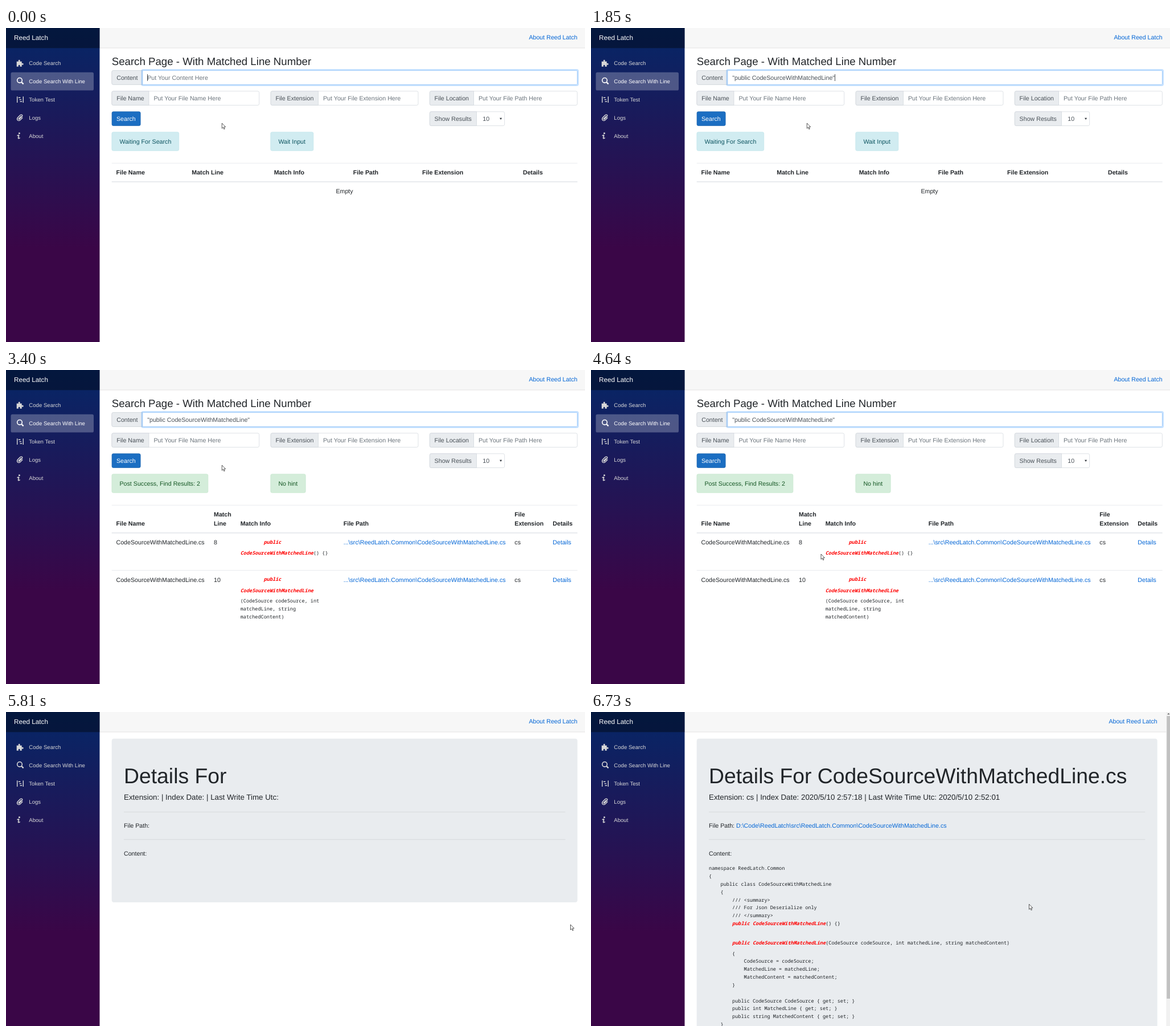
These frames come from a looping animation (1017 by 551 pixels, 8520 ms). An HTML page:

```html
<!DOCTYPE html>
<html lang="en">
<head>
<meta charset="utf-8">
<title>Search demo</title>
<style>
  html, body { margin: 0; width: 100%; height: 100%; overflow: hidden; background: #fff; }
  svg { display: block; width: 1017px; height: 551px; }
  text { font-family: "Liberation Sans", Arial, sans-serif; white-space: pre; text-rendering: geometricPrecision; }
  .mono { font-family: "Noto Sans Mono", monospace; font-size: 8.55px; fill: #212529; }
  .hit { fill: #f00; font-weight: 700; font-style: italic; }
</style>
</head>
<body>
<svg id="stage" viewBox="0 0 1017 551"></svg>
<script>
const LOOP = 8520, BASE = 32 / 3, EDGE = 1003.7;
const INK = '#212529', MUTED = '#495057', HINT = '#6c757d', LINK = '#0366d6';
const BRAND = 'Reed Latch', PROJECT = 'ReedLatch', NAME = 'CodeSourceWithMatchedLine';

// Text is placed by the middle of its line.
const text = (x, y, s, fill = INK, size = BASE, attrs = '') =>
  `<text x="${x}" y="${y + size * 0.3465}" font-size="${size}" fill="${fill}" ${attrs}>${s}</text>`;
const bold = (x, y, s) => text(x, y, s, INK, BASE, 'font-weight="700"');
const mono = (x, y, s) => `<text class="mono" x="${x}" y="${y + 3}">${s}</text>`;
const hit = s => `<tspan class="hit">${s}</tspan>`;
const rect = (x, y, w, h, fill, attrs = '') =>
  `<rect x="${x}" y="${y}" width="${w}" height="${h}" fill="${fill}" ${attrs}/>`;
const round = (x, y, w, h, fill, stroke) =>
  rect(x + .33, y + .33, w - .67, h - .67, fill, `rx="2.5" stroke="${stroke}" stroke-width=".67"`);
const group = (id, s) => `<g id="${id}">${s}</g>`;
const rule = (y, h = .67) => rect(185.7, y, EDGE - 185.7, h, '#dee2e6');

function field(x, split, right, y, label, value) {
  return round(x, y, right - x, 25.33, '#fff', '#ced4da') +
    `<path d="M${split} ${y + .33}H${x + 2.8}q-2.5 0-2.5 2.5v19.7q0 2.5 2.5 2.5H${split}z"
      fill="#e9ecef" stroke="#ced4da" stroke-width=".67"/>` +
    text(x + 8.6, y + 12.67, label, MUTED) + text(split + 8.5, y + 12.67, value, HINT);
}

const alertBox = (id, x, w, s, good) => group(id, good
  ? round(x, 182.3, w, 33.4, '#d4edda', '#c3e6cb') + text(x + 13.9, 199, s, '#155724')
  : round(x, 182.3, w, 33.4, '#d1ecf1', '#bee5eb') + text(x + 13.9, 199, s, '#0c5460'));

const line = (d, w) => `<path d="${d}" fill="none" stroke="currentColor" stroke-width="${w}"/>`;
const icons = [
  `<path transform="translate(18.7 55.7) scale(1.5)" fill="currentColor" d="M3 0Q2 0 2 1q0 .3.3 1H0v6h2.3
    Q2 7.3 2 7q0-1 1-1t1 1q0 .3-.3 1H6V5.7Q6.7 6 7 6q1 0 1-1T7 4q-.3 0-1 .3V2H3.7Q4 1.3 4 1 4 0 3 0z"/>`,
  '<circle cx="24" cy="91.8" r="4.3" fill="none" stroke="currentColor" stroke-width="1.6"/>' +
    line('M27.2 95l3.4 3.4', 2.2),
  line('M19.7 120.3v10.8M30.3 120.3v10.8M21.8 122.2h3.6M23.4 125.6h3.6M24.6 129h3.6', 1.4),
  line('M26.8 154.6l-4.3 4.3q-.8 1.3.4 1.5l4.7-4.3q2.2-2.5.3-3.7-1.6-.8-3.4.9l-4.1 4.2q-1.8 2.6.2 4.5 2.2 1.5 4.4-.5l4.2-4.2', 1.4),
  '<circle cx="23.4" cy="184.8" r="1.5" fill="currentColor"/>' +
    line('M19.6 189.2q2.6-1.9 3.1-.6l-1.2 4.3q-.1 2 3.1-.3', 1.6)
];
const labels = ['Code Search', 'Code Search With Line', 'Token Test', 'Logs', 'About'];

const chrome = `
  <defs><linearGradient id="side" x1="0" y1="0" x2="0" y2="1">
    <stop stop-color="#052767"/><stop offset=".7" stop-color="#3a0647"/>
  </linearGradient></defs>` +
  rect(0, 0, 1017, 551, '#fff') + rect(164.5, 0, 853, 35, '#f7f7f7') + rect(164.5, 34.7, 853, .67, '#d6d5d5') +
  rect(0, 0, 164.5, 551, 'url(#side)') + rect(0, 0, 164.5, 35.3, '#000', 'opacity=".4"') +
  text(14, 16.6, BRAND, '#fff', 11.73) +
  text(EDGE, 16, 'About ' + BRAND, LINK, BASE, 'id="about" text-anchor="end"') +
  rect(8.5, 77.8, 145.5, 31.8, '#fff', 'id="active" rx="2.67" opacity=".25"') +
  labels.map((s, i) => group('nav' + i, icons[i] + text(40.3, 61.6 + 32 * i, s, 'currentColor', 9.6))).join('');

const form =
  text(185.7, 58.3, 'Search Page - With Matched Line Number', INK, 18.67) +
  field(185.6, 239.6, EDGE, 74.3, 'Content', '') +
  group('focus',
    rect(238.5, 73.3, EDGE - 237.4, 27.4, 'none', 'rx="2" stroke="#007bff" stroke-opacity=".25" stroke-width="2.13"') +
    rect(239.9, 74.6, EDGE - 240.2, 24.7, '#fff', 'rx="1.5" stroke="#80bdff" stroke-width=".67"')) +
  text(248.2, 87, 'Put Your Content Here', HINT, BASE, 'id="empty"') +
  text(248.2, 87, `"public ${NAME}"`, MUTED, BASE, 'id="query"') +
  rect(0, 81, .8, 12, INK, 'id="caret"') +
  field(185.6, 251, 445, 110.5, 'File Name', 'Put Your File Name Here') +
  field(464.8, 548.5, 724.3, 110.5, 'File Extension', 'Put Your File Extension Here') +
  field(744, 821.5, EDGE, 110.5, 'File Location', 'Put Your File Path Here') +
  round(185.7, 146.5, 50.8, 25.33, '#1b6ec2', '#1861ac') + text(194, 159.2, 'Search', '#fff') +
  field(744, 826.5, 876, 146.5, 'Show Results', '') + text(837.3, 159.2, '10', MUTED) +
  '<path d="M867 157.8h4.2l-2.1 3.2z" fill="#343a40"/>' +
  alertBox('waiting', 185.6, 118.4, 'Waiting For Search') +
  alertBox('success', 185.6, 169.6, 'Post Success, Find Results: 2', true) +
  alertBox('wait', 464.5, 75.7, 'Wait Input') +
  alertBox('nohint', 464.5, 62, 'No hint', true) +
  rule(236.8);

const emptyTable =
  [['File Name', 193.5], ['Match Line', 326.3], ['Match Info', 470.7], ['File Path', 609.7],
    ['File Extension', 731], ['Details', 908]].map(([s, x]) => bold(x, 253.6, s)).join('') +
  rule(269.2, 1.33) + text(594.5, 286.6, 'Empty', INK, BASE, 'text-anchor="middle"');

const row = (y, n) =>
  text(193.5, y, NAME + '.cs') + text(365, y, n) +
  text(592.7, y, `...\\src\\${PROJECT}.Common\\${NAME}.cs`, LINK) +
  text(893.3, y, 'cs') + text(960.3, y, 'Details', LINK, BASE, `id="link${n}"`) +
  mono(411.7, y - .7, '        ' + hit('public')) +
  mono(411.7, y + 18.6, hit(NAME) + (n == 8 ? '() {}' : ''));

const results =
  bold(365, 253.6, 'Match') + bold(893.3, 253.6, 'File') +
  [['File Name', 193.5], ['Line', 365], ['Match Info', 411.7], ['File Path', 592.7],
    ['Extension', 893.3], ['Details', 960.3]].map(([s, x]) => bold(x, 269.6, s)).join('') +
  rule(285.2, 1.33) + row(302.2, 8) + rule(351.2) + row(368, 10) +
  ['(CodeSource codeSource, int', 'matchedLine, string', 'matchedContent)']
    .map((s, i) => mono(411.7, 405.2 + 13.9 * i, s)).join('');

// One entry per source line; the gaps around the highlighted lines differ.
const signature = hit('public ' + NAME);
const blocks = [
  [274.2, [`namespace ${PROJECT}.Common`, '{', `    public class ${NAME}`, '    {',
    '        /// &lt;summary>', '        /// For Json Deserialize only', '        /// &lt;/summary>',
    `        ${signature}() {}`]],
  [404.5, [`        ${signature}(CodeSource codeSource, int matchedLine, string matchedContent)`]],
  [423.5, ['        {', '            CodeSource = codeSource;', '            MatchedLine = matchedLine;',
    '            MatchedContent = matchedContent;', '        }', '',
    '        public CodeSource CodeSource { get; set; }', '        public int MatchedLine { get; set; }',
    '        public string MatchedContent { get; set; }', '    }']]
];

function details(right, bottom, name, ext, indexed, written, path) {
  return rect(185.7, 46.8, right - 185.7, bottom - 46.8, '#e9ecef', 'rx="4"') +
    text(207, 112, 'Details For ' + name, INK, 37.33) +
    text(207, 149.4, `Extension: ${ext}| Index Date: ${indexed}| Last Write Time Utc: ${written}`, INK, 13.33) +
    [175.2, 223.5].map(y => rect(207, y, right - 228.3, .67, '#000', 'opacity=".12"')).join('') +
    text(207, 199.6, `File Path: <tspan fill="${LINK}">${path}</tspan>`) + text(207, 248.6, 'Content:');
}

const filled =
  details(994.7, 560, NAME + '.cs', 'cs ', '2020/5/10 2:57:18 ', '2020/5/10 2:52:01',
    `D:\\Code\\${PROJECT}\\src\\${PROJECT}.Common\\${NAME}.cs`) +
  blocks.map(([y, lines]) => lines.map((s, i) => mono(207, y + 13.85 * i, s)).join('')).join('') +
  rect(1010.3, 0, 6.7, 551, '#f1f1f1') + rect(1011.3, 7, 5.7, 496, '#c1c1c1') +
  '<path d="M1012.2 4.3l2.2-2.3 2.2 2.3z" fill="#505050"/>';

const cursor = `<g id="cursor" fill="#fff" stroke="#222" stroke-width=".75" stroke-linejoin="round">
  <path id="arrow" d="M0 0v9.2l2.1-1.9 1.5 3.3 1.4-.6-1.5-3.2 2.9-.2z"/>
  <path id="hand" d="M-.9.9Q-.9 0 0 0t.9.9v3.4l3.6.9q1 .3.9 1.3l-.6 3.6-.7 1.8H-.2l-1.2-2-2.3-2.8q-.2-1 1-.9l1.8 1.2z"/></g>`;

stage.innerHTML = chrome +
  group('search', form + group('before', emptyTable) + group('after', results)) +
  group('blank', details(EDGE, 334, '', '', '', '', '')) + group('filled', filled) + cursor;

const el = id => document.getElementById(id);
const show = (id, on) => { el(id).style.display = on ? '' : 'none'; };

const blinks = [380, 920, 1470, 1850, 2400, 2860, 3400, 3950, 4490, 5030, 5570];
const moves = [
  { start: 4250, end: 4640, n: 6, path: [[375, 167], [458, 270], [404, 323]] },
  { start: 4790, end: 5570, n: 11, path: [[404, 323], [700, 428], [991.5, 373]] },
  { start: 6200, end: 6580, n: 6, path: [[991.5, 373], [880, 350], [769.5, 336.5]] }
];

// The pointer is sampled in steps along eased curves.
function pointer(t) {
  let p = t < 4100 ? [379.3, 167] : [375.5, 167];
  for (const { start, end, n, path: [a, b, c] } of moves) {
    if (t < start) break;
    const k = Math.min(n, 1 + Math.floor((t - start) / (end - start) * (n - 1) + 1e-6)) / n;
    const u = k * k * (3 - 2 * k);
    p = a.map((v, i) => (1 - u) ** 2 * v + 2 * u * (1 - u) * b[i] + u * u * c[i]);
  }
  return t < 6730 ? p : [769.5, 337.2];
}

function draw(now) {
  const t = now % LOOP;
  const typed = t >= 1850, found = t >= 3010, left = t >= 5810, loaded = t >= 5890;
  const hover = t >= 5570 && !left;
  show('search', !left);
  show('active', !left);
  show('blank', left && !loaded);
  show('filled', loaded);
  show('focus', t < 5650);
  show('empty', !typed);
  show('query', typed);
  show('waiting', !found);
  show('success', found);
  show('before', !found);
  show('after', found);
  show('wait', t < 2000);
  show('nohint', t >= 2000);
  show('caret', blinks.filter(b => b <= t).length % 2 === 0);
  el('caret').setAttribute('x', typed ? 428.2 : 248);
  el('about').setAttribute('x', loaded ? 994.7 : EDGE);
  labels.forEach((_, i) => { el('nav' + i).style.color = i === 1 && !left ? '#fff' : '#d7d7d7'; });
  el('link10').setAttribute('text-decoration', hover ? 'underline' : 'none');
  el('link10').setAttribute('fill', hover ? '#014c8c' : LINK);
  show('hand', hover);
  show('arrow', !hover);
  el('cursor').setAttribute('transform', `translate(${pointer(t)})`);
}

const begin = performance.now();
function tick() {
  draw(performance.now() - begin);
  requestAnimationFrame(tick);
}
tick();
</script>
</body>
</html>
```
